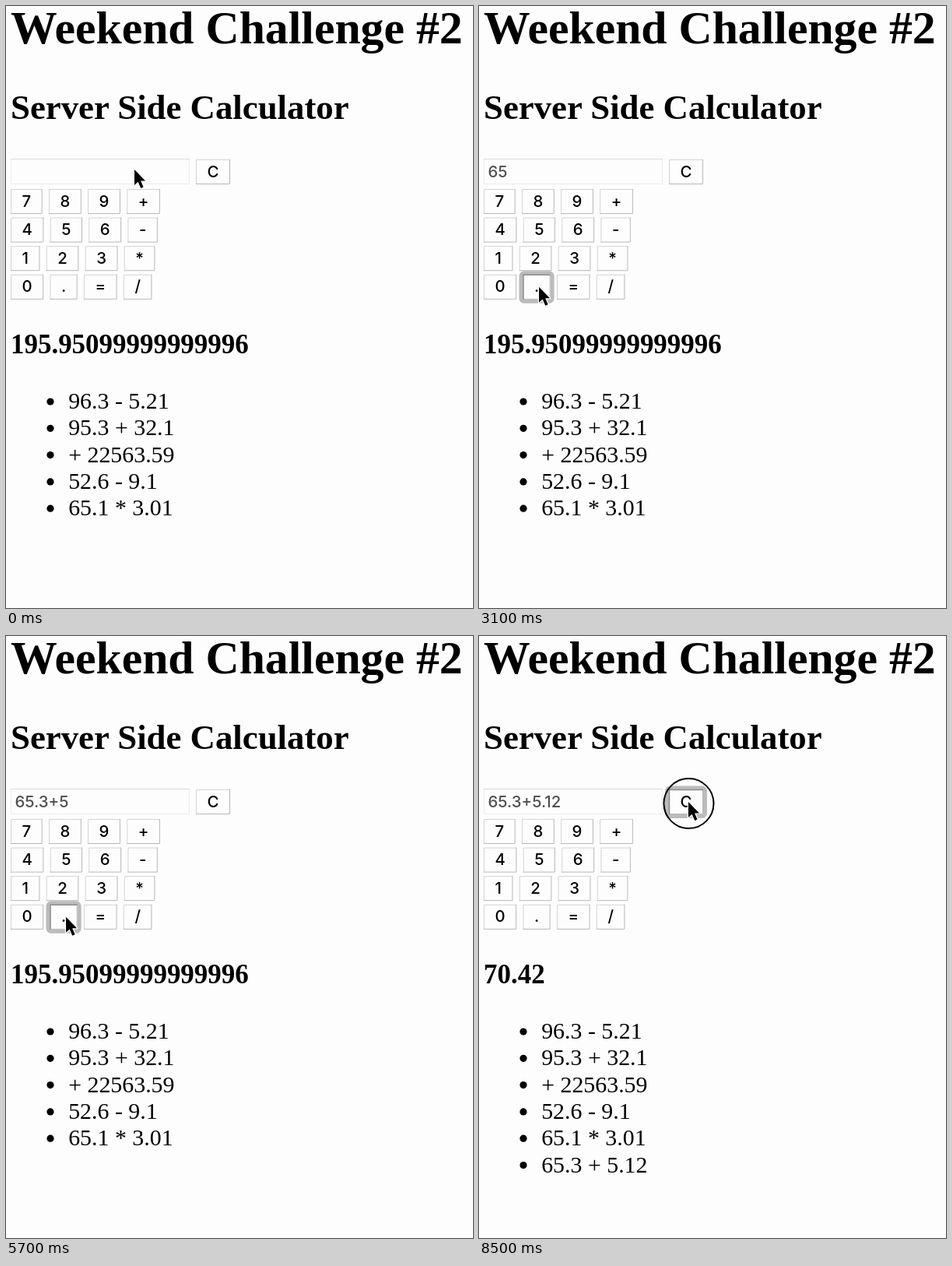
Recreate the animation shown at these times as an HTML page. Size 600 px wide and 773 px high, loop 8.6 s.

```html
<!DOCTYPE html>
<html lang="en">
<head>
<meta charset="utf-8">
<title>Server Side Calculator</title>
<style>
  html, body { margin: 0; width: 100%; height: 100%; overflow: hidden; background: #fefdfe; }
  svg { display: block; width: 100vw; height: 100vh; }
  .serif { font-family: "Liberation Serif", Times, serif; }
  .bold { font-weight: 700; }
  .ui { font: 450 20.4px Inter, sans-serif; }
  .key { text-anchor: middle; }
  #entry { fill: #505050; }
</style>
</head>
<body>
<svg viewBox="0 0 600 773">
  <g class="serif bold">
    <text x="6" y="48" font-size="59.73">Weekend Challenge #2</text>
    <text x="6" y="145" font-size="44.8">Server Side Calculator</text>
    <text id="result" x="6" y="446" font-size="34.95"></text>
  </g>
  <g id="history" class="serif" font-size="29.87"></g>
  <rect x="6.5" y="196.5" width="229" height="32" fill="none" stroke="#ececec"/>
  <path d="M6 196.5H236" stroke="#dcdcdc"/>
  <text id="entry" class="ui" x="11.5" y="219.5"></text>
  <g id="keys"></g>
  <rect id="halo" rx="4" fill="none" stroke="#bbb" stroke-width="5"/>
  <path id="inset" fill="none" stroke="#8c8c8c" stroke-width="1.5"/>
  <g id="pointer">
    <circle id="ring" cx=".5" cy="2" r="32" fill="none" stroke="#000" stroke-width="2"/>
    <path d="M0 0V20L4.6 15.8L8.2 24L11.6 22.4L8.1 14.4H14Z" stroke="#fff" stroke-width="2.4" stroke-linejoin="round" paint-order="stroke"/>
  </g>
</svg>
<script>
const LOOP = 8600, STEP = 100, HOLD = 200, TRAVEL = 700;
const LEFT = 6, GAP = 8.3, PADDING = 29, KEY_HEIGHT = 32, ROW_PITCH = 36.6;
const $ = id => document.getElementById(id);

function set(el, attrs) {
  for (const name in attrs) el.setAttribute(name, attrs[name]);
  return el;
}

function add(parent, tag, attrs, text = '') {
  const el = set(document.createElementNS('http://www.w3.org/2000/svg', tag), attrs);
  el.textContent = text;
  return parent.appendChild(el);
}

// Keys flow from the left; each is as wide as its label plus padding.
const keys = {};
function addRow(labels, left, top) {
  for (const label of labels) {
    const text = add($('keys'), 'text', { class: 'ui key', y: top + 22.5 }, label);
    const w = text.getComputedTextLength() + PADDING, right = left + w, bottom = top + KEY_HEIGHT;
    set(text, { x: left + w / 2 });
    add($('keys'), 'path', { d: `M${left + .5} ${bottom}V${top + .5}H${right}`, fill: 'none', stroke: '#d4d4d4' });
    add($('keys'), 'path', { d: `M${left} ${bottom - .5}H${right - .5}V${top}`, fill: 'none', stroke: '#b8b8b8' });
    keys[label] = { left, top, w, x: left + w / 2 + 3, y: top + KEY_HEIGHT / 2 };
    left = right + GAP;
  }
}
addRow('C', 244, 197);
['789+', '456-', '123*', '0.=/'].forEach((labels, i) => addRow(labels, LEFT, 235 + i * ROW_PITCH));

const sums = ['96.3 - 5.21', '95.3 + 32.1', '+ 22563.59', '52.6 - 9.1', '65.1 * 3.01', '65.3 + 5.12'];
const items = sums.map((sum, i) => {
  const item = add($('history'), 'g', { transform: `translate(0 ${i * 34.3})` });
  add(item, 'circle', { cx: 57, cy: 508, r: 4.6 });
  add(item, 'text', { x: 80.2, y: 517 }, sum);
  return item;
});

const times = [1300, 2100, 3100, 3900, 4500, 5100, 5700, 6200, 6600, 7100, 8400];
const presses = [...'65.3+5.12=C'].map((label, i) => ({ label, time: times[i], ...keys[label] }));
const rest = { label: '', time: -LOOP, x: 165, y: 210 };

// The pointer reaches each key just before the press and leaves on release.
function pointerAt(t, last, next) {
  if (!next) return [last.x, last.y];
  const end = next.time - STEP, start = Math.max(last.time + HOLD, end - TRAVEL);
  const p = Math.min(1, Math.max(0, (t - start) / (end - start)));
  const ease = p * p * (3 - 2 * p);
  return [last.x + (next.x - last.x) * ease, last.y + (next.y - last.y) * ease];
}

const show = (el, on) => { el.style.display = on ? '' : 'none'; };

function draw(t) {
  const last = presses.findLast(p => p.time <= t) || rest;
  const next = presses.find(p => p.time > t);
  const held = t < last.time + HOLD;
  const entered = presses.filter(p => p.time + HOLD <= t).map(p => p.label).join('');
  const solved = entered.includes('=');

  $('entry').textContent = entered.replace('=', '');
  $('result').textContent = solved ? '70.42' : '195.95099999999996';
  show(items[5], solved);

  show($('halo'), last !== rest);
  show($('inset'), held);
  if (last !== rest) {
    const { left, top, w } = last;
    set($('halo'), { x: left - 2.5, y: top - 2, width: w + 5, height: KEY_HEIGHT + 4.5 });
    set($('inset'), { d: `M${left + .5} ${top + KEY_HEIGHT}V${top + .5}H${left + w}` });
  }
  show($('ring'), held && t >= last.time + STEP);
  set($('pointer'), { transform: `translate(${pointerAt(t, last, next)})` });
}

function tick() {
  draw(Math.floor(performance.now() % LOOP / STEP) * STEP);
  requestAnimationFrame(tick);
}
tick();
</script>
</body>
</html>
```
